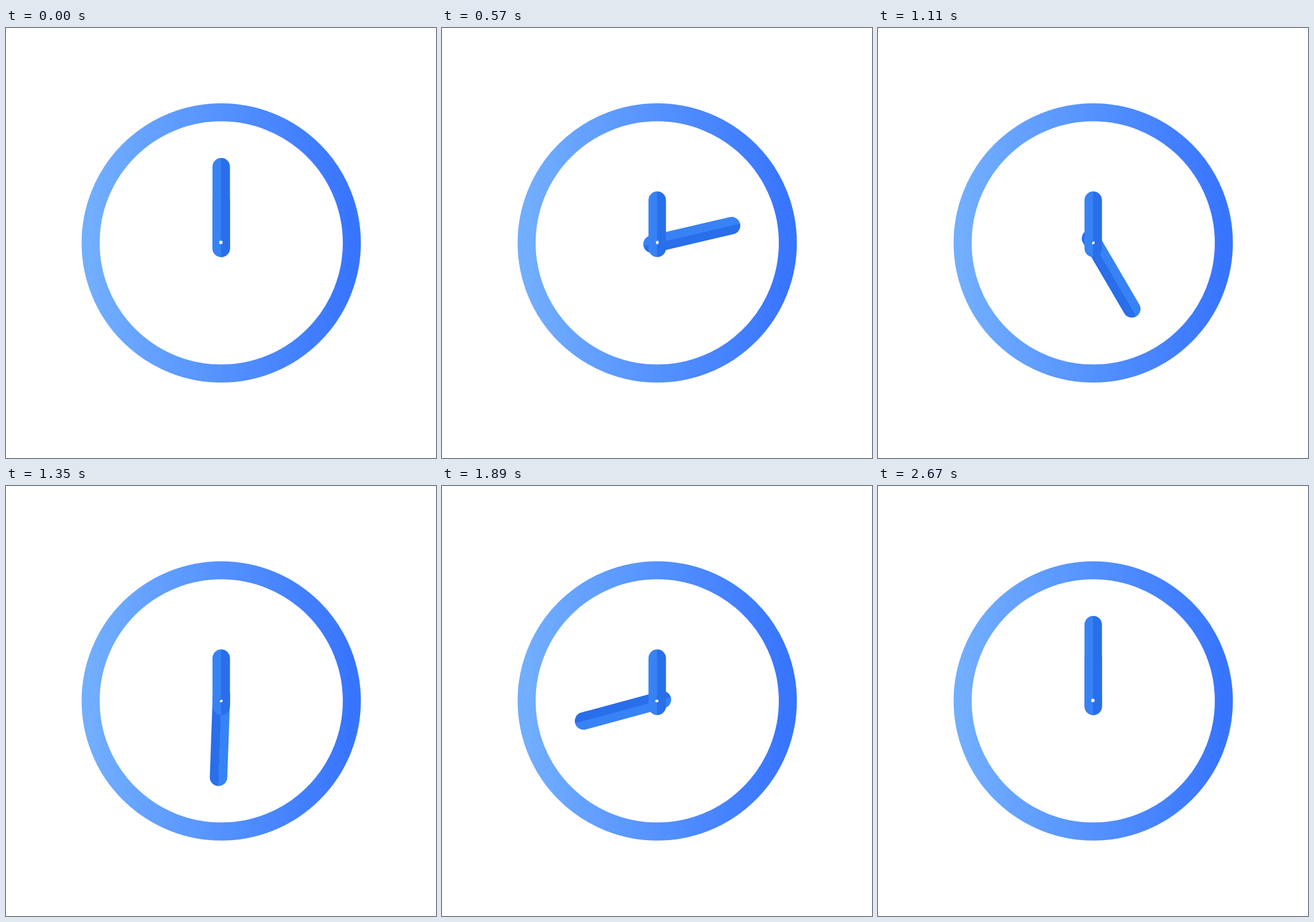
These frames come from a looping animation (748 px wide and 748 px high, 2700 ms). An HTML page:

```html
<!DOCTYPE html>
<html lang="en">
<head>
<meta charset="utf-8">
<title>Clock</title>
<style>
  html, body { margin: 0; width: 100%; height: 100%; overflow: hidden; background: #fff; }
  svg { display: block; width: 100%; height: 100%; }
</style>
</head>
<body>
<svg viewBox="0 0 748 748">
  <defs>
    <linearGradient id="rim">
      <stop offset="0" stop-color="#71aeff"/>
      <stop offset="1" stop-color="#3875ff"/>
    </linearGradient>
    <linearGradient id="split">
      <stop offset=".5" stop-color="#3783f5"/>
      <stop offset=".5" stop-color="#296eeb"/>
    </linearGradient>
  </defs>
  <circle cx="374.4" cy="373.8" r="227.2" fill="none" stroke="url(#rim)" stroke-width="31.4"/>
  <g transform="translate(374.4 374)" fill="url(#split)" fill-rule="evenodd">
    <path id="minute"/>
    <path id="hour"/>
  </g>
</svg>
<script>
  const LOOP = 2700, STEP = 30;
  const minute = document.getElementById('minute');
  const hour = document.getElementById('hour');

  // Rounded bar around the pivot with a slightly off-centre pin hole.
  const hand = length =>
    `M-15.2 ${15.2 - length}a15.2 15.2 0 0 1 30.4 0V9.3a15.2 15.2 0 0 1 -30.4 0z` +
    'M-3.8 -1a3.2 3.2 0 1 0 6.4 0a3.2 3.2 0 1 0 -6.4 0z';

  minute.setAttribute('d', hand(148));
  hour.setAttribute('d', hand(89.7));

  function draw() {
    const time = Math.floor(performance.now() % LOOP / STEP) * STEP;
    minute.setAttribute('transform', `rotate(${360 * time / (LOOP - STEP)})`);
    requestAnimationFrame(draw);
  }
  draw();
</script>
</body>
</html>
```
